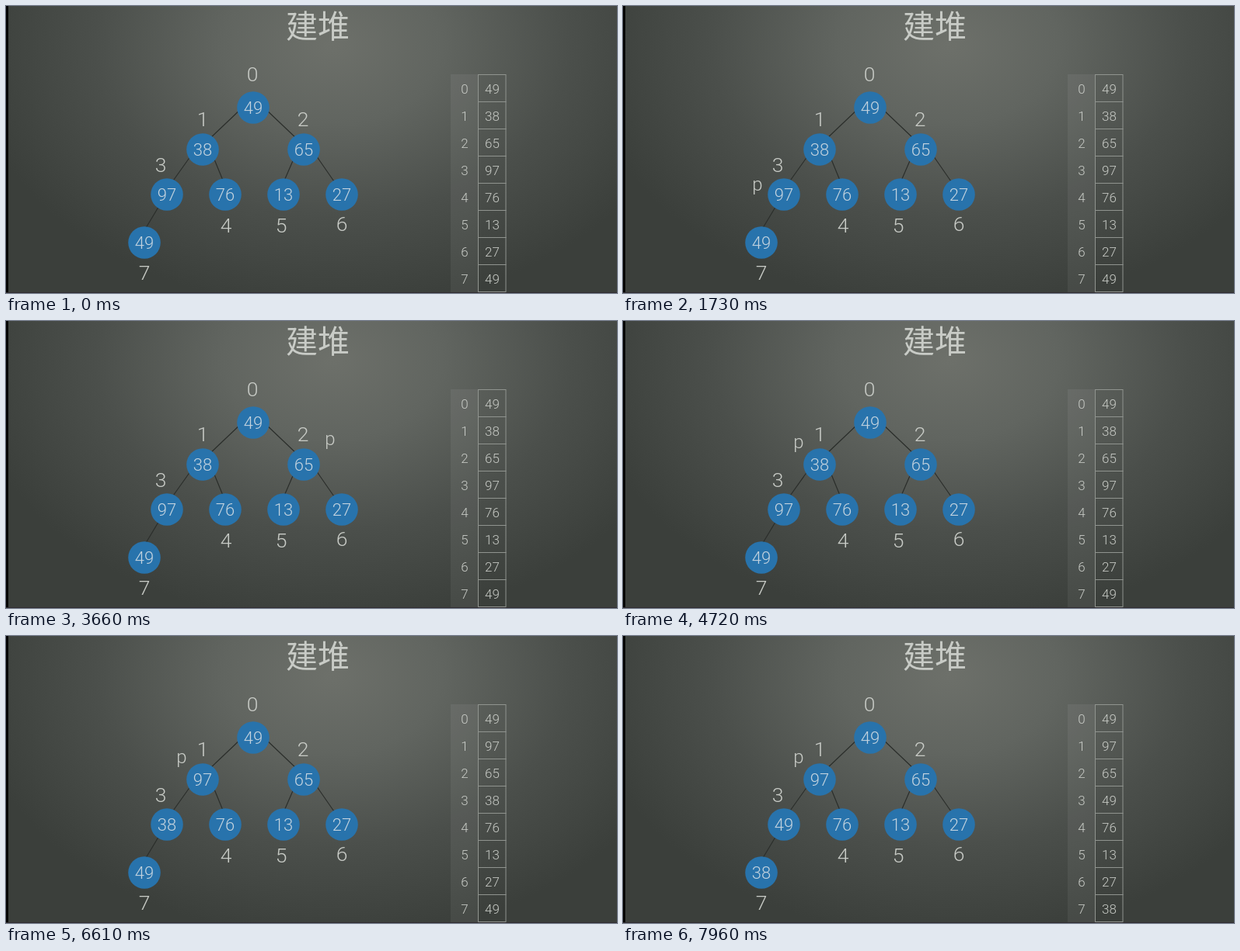
Recreate the animation shown at these times as an HTML page. Size 786 by 370 pixels, loop 7990 ms.

```html
<!DOCTYPE html>
<html lang="zh">
<head>
<meta charset="utf-8">
<style>
html, body { margin: 0; width: 100%; height: 100%; overflow: hidden; background: #3c403c; }
svg { display: block; width: 786px; height: 370px; }
text { font-family: Roboto, "Liberation Sans", sans-serif; font-weight: 300; fill: #c8cbc6; text-anchor: middle; }
.title { font: 300 41px "Noto Sans CJK SC", "Noto Sans CJK", sans-serif; }
.label { font-size: 26.5px; }
.node text { font-size: 22px; fill: #c3d3df; }
.cell { font-size: 17px; }
</style>
</head>
<body>
<svg id="stage" viewBox="0 0 786 370">
  <defs>
    <radialGradient id="bg" gradientUnits="userSpaceOnUse" cx="0" cy="0" r="1" gradientTransform="translate(420 50) scale(470 340)">
      <stop offset="0" stop-color="#6d706a"/>
      <stop offset=".3" stop-color="#616560"/>
      <stop offset=".65" stop-color="#4b4f4b"/>
      <stop offset="1" stop-color="#3b3f3b"/>
    </radialGradient>
  </defs>
  <rect width="786" height="370" fill="url(#bg)"/>
  <rect width="3" height="370" fill="#050505"/>
  <rect y="369" width="786" height="1" fill="#302c31"/>
  <text class="title" x="401" y="41">建堆</text>
  <path d="M303 132L261 172M334 133L376 173M240 190L213 228M264 188L282 232M374 188L355 232M397 190L424 229M204 246L174 296" fill="none" stroke="#2b2e2b" stroke-width="1.2"/>
</svg>
<script>
const stage = document.getElementById('stage');
const LOOP = 7990, MOVE = 400;
const values = [49, 38, 65, 97, 76, 13, 27, 49];
const spots = [[318, 131], [253, 185], [383, 185], [207, 243], [282, 243], [357, 243], [432, 243], [178, 305]];
const labels = [[317, 97], [253, 155], [382, 155], [199, 214], [283, 292], [354, 292], [432, 290], [178, 353]];
const swaps = [{ at: 6082, a: 1, b: 3 }, { at: 7490, a: 3, b: 7 }];
const pointer = [{ at: 2950, x: 417, y: 160 }, { at: 4300, x: 226, y: 164 }];

function add(tag, attrs, parent = stage, text = '') {
  const el = document.createElementNS('http://www.w3.org/2000/svg', tag);
  for (const k in attrs) el.setAttribute(k, attrs[k]);
  el.textContent = text;
  return parent.appendChild(el);
}

const ease = (t, at, d = MOVE) => {
  const k = Math.min(1, Math.max(0, (t - at) / d));
  return k * k * (3 - 2 * k);
};
const mix = (a, b, k) => a + (b - a) * k;

// table
add('rect', { x: 572, y: 88, width: 35, height: 281, fill: '#fff', 'fill-opacity': .06 });
const cells = values.map((v, i) => {
  const y = 88.5 + i * 35;
  add('rect', { x: 607.5, y, width: 35.5, height: 35, fill: 'none', stroke: '#90948f' });
  add('text', { class: 'cell', x: 590, y: y + 24 }, stage, i);
  return [0, 1].map(() => add('text', { class: 'cell', x: 625.5, y: y + 24 }, stage, v));
});

// tree
labels.forEach(([x, y], i) => add('text', { class: 'label', x, y }, stage, i));
const nodes = values.map(v => {
  const g = add('g', { class: 'node' });
  add('circle', { r: 20.8, fill: '#2873ac' }, g);
  add('text', { y: 8 }, g, v);
  return g;
});
const p = add('text', { class: 'label', style: 'font-size:24px' }, stage, 'p');

function draw(t) {
  const pos = spots.map(s => [...s]);
  const order = values.map((v, i) => i);
  const rows = values.map(v => [v, v, 1]);

  for (const { at, a, b } of swaps) {
    const k = ease(t, at);
    if (!k) continue;
    const m = order[a], n = order[b];
    [[m, a, b], [n, b, a]].forEach(([id, from, to]) => {
      pos[id] = [0, 1].map(c => mix(spots[from][c], spots[to][c], k));
      rows[to] = [values[order[to]], values[id], k];
    });
    order[a] = n;
    order[b] = m;
  }

  nodes.forEach((g, i) => g.setAttribute('transform', `translate(${pos[i]})`));
  cells.forEach((pair, i) => {
    const [before, after, k] = rows[i];
    pair[0].textContent = before;
    pair[1].textContent = after;
    pair[0].setAttribute('opacity', 1 - k);
    pair[1].setAttribute('opacity', k);
  });

  let x = 173, y = 238;
  for (const s of pointer) {
    const k = ease(t, s.at);
    x = mix(x, s.x, k);
    y = mix(y, s.y, k);
  }
  p.setAttribute('x', x);
  p.setAttribute('y', y);
  p.setAttribute('opacity', ease(t, 1100, 300));
}

const start = performance.now();
function frame() {
  draw((performance.now() - start) % LOOP);
  requestAnimationFrame(frame);
}
draw(0);
requestAnimationFrame(frame);
</script>
</body>
</html>
```
